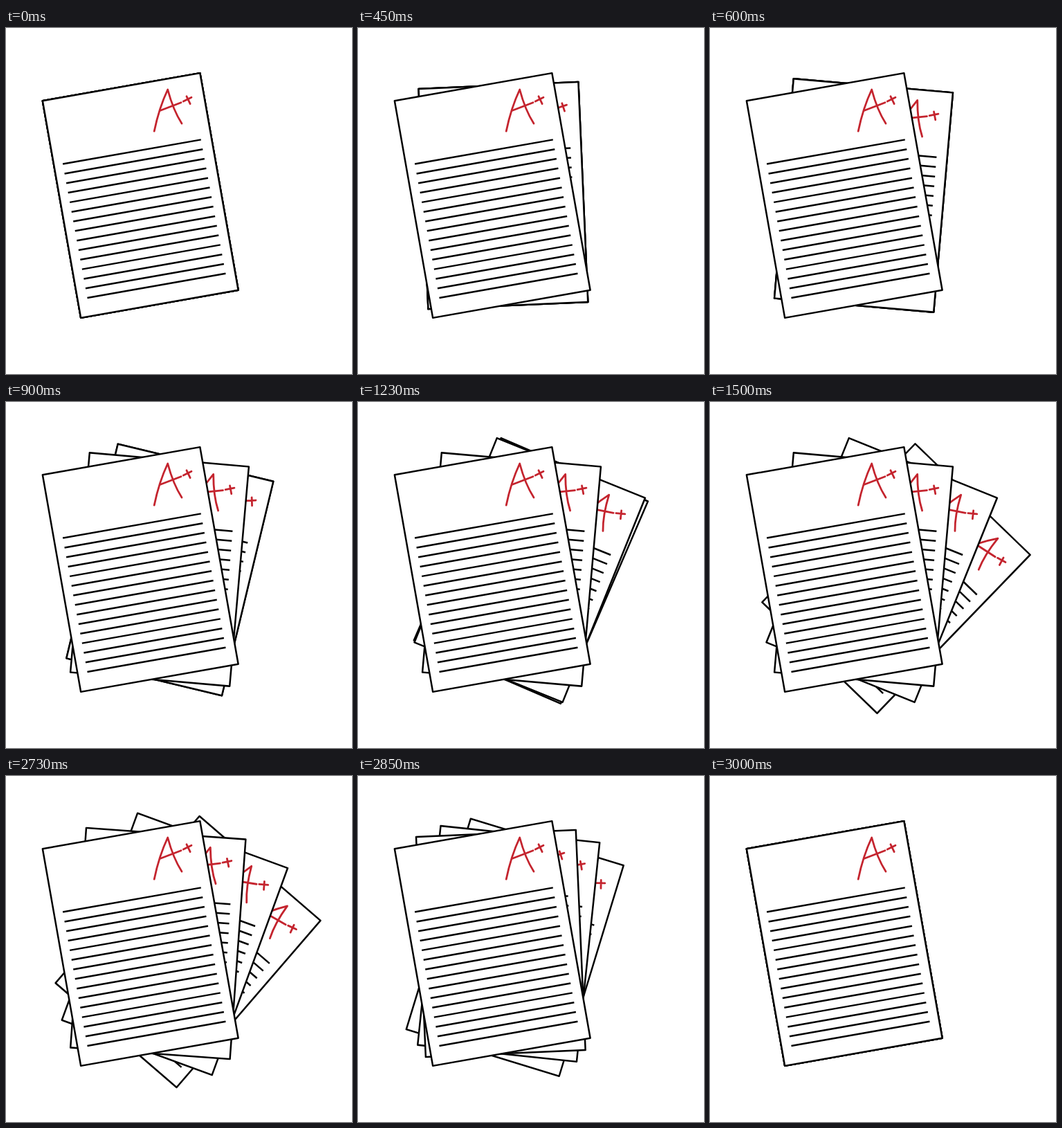
An HTML page for the animation above (3.6 s loop, 500 by 500 pixels).

```html
<!DOCTYPE html>
<html lang="en">
<head>
<meta charset="utf-8">
<title>Graded papers</title>
<style>
  html, body { margin: 0; width: 100%; height: 100%; overflow: hidden; background: #fff; }
  svg { display: block; width: 100%; height: 100%; }
</style>
</head>
<body>
<svg id="stage" viewBox="0 0 500 500">
  <defs>
    <g id="paper" fill="none" stroke="#000" stroke-width="2.5">
      <rect x="-115.5" y="-159.2" width="231" height="318.4" fill="#fff" stroke-linejoin="round"/>
      <path id="rules"/>
      <g transform="rotate(10) translate(-194.25 -242)" stroke="#c4242e" stroke-width="2.8"
         stroke-linecap="round" stroke-linejoin="round">
        <path d="M214.2 149.2Q221 116 233.7 89Q241.5 118.5 254 138M223 119.3L253 107.8"/>
        <path d="M256.3 106L268 100.3M261 98.8L266.2 109.6"/>
      </g>
    </g>
  </defs>
</svg>
<script>
const LOOP = 3600, STEP = 30, MOVE = 300;
const FAN_STARTS = [300, 750, 1200];
const RETURN_START = 2700;

// Centre and angle of each place in the fan.
const POSES = [
  { x: 194.25, y: 242, a: -10 },
  { x: 222, y: 242, a: 5 },
  { x: 248.2, y: 243, a: 22 },
  { x: 269, y: 255.1, a: 44 }
];

const stage = document.getElementById('stage');

let rules = '';
for (let i = 0; i < 15; i++) {
  const y = -64.2 + i * 14.05;
  rules += `M${-102.6 + i * 0.09} ${y}L${100.2 + i * 0.11} ${y}`;
}
document.getElementById('rules').setAttribute('d', rules);

// The last pose lies at the bottom of the stack.
const papers = POSES.map(() => {
  const use = document.createElementNS('http://www.w3.org/2000/svg', 'use');
  use.setAttribute('href', '#paper');
  stage.prepend(use);
  return use;
});

const mix = (a, b, p) => a + (b - a) * p;
const progress = (t, start) => Math.min(1, Math.max(0, (t - start) / MOVE));

// The slide runs slightly ahead of the turn.
function blend(from, to, t) {
  const turn = t - 0.43 * Math.sin(2 * Math.PI * t) / (2 * Math.PI);
  const slide = turn + 0.065 * Math.sin(Math.PI * t);
  return {
    x: mix(from.x, to.x, slide),
    y: mix(from.y, to.y, slide),
    a: mix(from.a, to.a, turn)
  };
}

function poseAt(index, t) {
  if (t > RETURN_START) return blend(POSES[index], POSES[0], progress(t, RETURN_START));
  let pose = POSES[0];
  for (let i = 0; i < index; i++) {
    pose = blend(pose, POSES[i + 1], progress(t, FAN_STARTS[i]));
  }
  return pose;
}

function draw(ms) {
  const t = Math.floor((ms % LOOP) / STEP) * STEP;
  papers.forEach((paper, i) => {
    const { x, y, a } = poseAt(i, t);
    paper.setAttribute('transform', `translate(${x} ${y}) rotate(${a})`);
  });
}

let begin;
function tick(now) {
  begin ??= now;
  draw(now - begin);
  requestAnimationFrame(tick);
}
draw(0);
requestAnimationFrame(tick);
</script>
</body>
</html>
```
